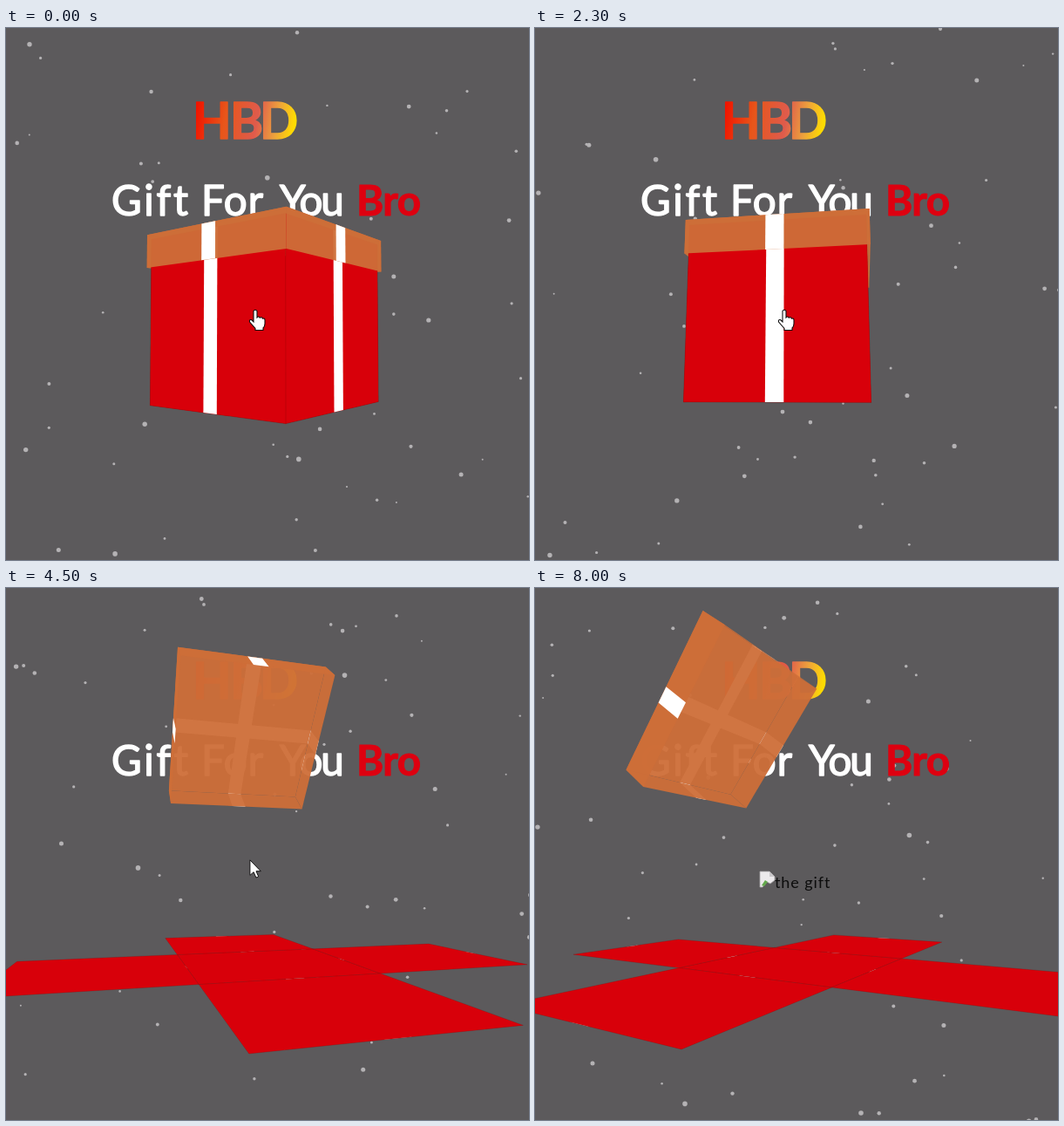
An HTML page for the animation above (8100 ms loop, 600 by 610 pixels).

```html
<!DOCTYPE html>
<html lang="en">
<head>
<meta charset="utf-8">
<title>Gift box</title>
<style>
  html, body { margin: 0; width: 100%; height: 100%; overflow: hidden; background: #5c5a5c; }
  svg { display: block; width: 600px; height: 610px; }
  text { font-family: "Comic Sans MS", "Comic Neue", Lato, sans-serif; }
  .line { font-size: 47.5px; fill: #fff; stroke: #fff; stroke-width: 1.5; stroke-linejoin: round; }
  .bro { font-weight: 700; fill: #de0010; stroke: #de0010; stroke-width: 1; }
  .hbd { font-size: 58px; font-weight: 700; fill: url(#warm); stroke: url(#warm); stroke-width: 1.4; stroke-linejoin: round; }
  .alt { font-size: 18px; letter-spacing: .9px; fill: #0c0c0c; }
  .red { fill: #d8000a; stroke: #8a0008; stroke-opacity: .4; stroke-width: .6; }
  .lid { fill: #ce6e38; fill-opacity: .95; }
  .band { fill: #fff; }
</style>
</head>
<body>
<svg viewBox="0 0 600 610">
  <defs>
    <linearGradient id="warm" gradientUnits="userSpaceOnUse" x1="218" y1="95" x2="330" y2="115">
      <stop offset="0" stop-color="#f01400"/>
      <stop offset=".3" stop-color="#e8561a"/>
      <stop offset=".62" stop-color="#df5b4c"/>
      <stop offset=".82" stop-color="#eda23c"/>
      <stop offset="1" stop-color="#ffdc00"/>
    </linearGradient>
  </defs>
  <rect width="600" height="610" fill="#5c5a5c"/>
  <g id="snow" fill="#b4b2b4"></g>
  <text class="hbd" x="214 257 291" y="127">HBD</text>
  <g class="line">
    <text x="121" y="215" letter-spacing="2.8">Gift</text>
    <text x="224" y="215" letter-spacing="1">For</text>
    <text x="314" y="215" letter-spacing="-2">You</text>
    <text class="bro" x="402" y="215" letter-spacing="-.6">Bro</text>
  </g>
  <g id="box"></g>
  <g id="gift">
    <path d="M258 325h11l6 6v4l-5 4-4-2-5 6h-3z" fill="#eceaec" stroke="#a5a3a5" stroke-width=".8"/>
    <path d="M260 341l4-6 3 2-4 5z" fill="#63a84c"/>
    <path d="M269 325v6h6z" fill="#c9c7c9"/>
    <text class="alt" x="275" y="344">the gift</text>
  </g>
  <path id="arrow" d="M0 0V17.5L4.2 13.8 7 20.2 9.8 19 7.1 12.8H12.4Z" fill="#fff" stroke="#111" stroke-width="1"/>
  <path id="hand" d="M-2 1.5Q0-1 2 1.5V9Q4 7 5.2 9.2 7.5 7.8 8.4 10.2 11 9.5 11 12V16Q11 19 9 21V23.5H0V21.5L-6.5 14Q-7 11-4.5 11.5L-2 14Z" fill="#fff" stroke="#111" stroke-width="1.1"/>
</svg>
<script>
const LOOP = 8100, STEP = 100;
const DEPTH = 560, CX = 300, HORIZON = 335;
const HALF = 92.6, FLOOR = 95, BAND = .1;
const LID_HALF = 96, LID_H = 37, LID_TOP = -95;
const SIDES = [0, 1, 2, 3].map(k => k * Math.PI / 2);

const $ = id => document.getElementById(id);
const rad = deg => deg * Math.PI / 180;
const clamp = v => Math.max(0, Math.min(1, v));
const mix = (a, b, p) => a + (b - a) * p;
const span = (t, a, b) => clamp((t - a) / (b - a));
const smooth = p => p * p * (3 - 2 * p);

// Same curve as the CSS keyword "ease"
function ease(x) {
  const curve = (s, a, b) => 3 * s * (1 - s) ** 2 * a + 3 * s * s * (1 - s) * b + s ** 3;
  let lo = 0, hi = 1;
  for (let i = 0; i < 20; i++) {
    const mid = (lo + hi) / 2;
    if (curve(mid, .25, .25) < x) lo = mid; else hi = mid;
  }
  return x >= 1 ? 1 : curve(lo, .1, 1);
}

function random(seed) {
  return () => {
    seed = (seed * 1664525 + 1013904223) >>> 0;
    return seed / 4294967296;
  };
}

const rnd = random(77);
const flakes = Array.from({ length: 60 }, () => ({
  x: rnd() * 620, y: rnd() * 630, r: 1 + 1.8 * rnd(), vx: (rnd() - .5) * 24, vy: 30 + 50 * rnd()
}));

function drawSnow(sec) {
  const wrap = (v, size) => ((v % size) + size) % size - 10;
  $("snow").innerHTML = flakes.map(f => {
    const x = wrap(f.x + f.vx * sec, 620), y = wrap(f.y + f.vy * sec, 630);
    return `<circle cx="${x.toFixed(1)}" cy="${y.toFixed(1)}" r="${f.r.toFixed(1)}"/>`;
  }).join("");
}

function camera(turn, tilt, zoom, shift) {
  const s = Math.sin(turn), c = Math.cos(turn), ts = Math.sin(tilt), tc = Math.cos(tilt);
  return ([x, y, z]) => {
    const rx = x * c + z * s, rz = z * c - x * s;
    const py = y * tc - rz * ts, pz = rz * tc + y * ts;
    const k = zoom * DEPTH / (DEPTH - pz);
    return [CX + shift + rx * k, HORIZON + py * k, pz];
  };
}

// at(u, v) maps u, v in 0..1 to a point on a face
const patch = (at, u0, u1, v0, v1) => [at(u0, v0), at(u1, v0), at(u1, v1), at(u0, v1)];
const polygon = (name, pts) =>
  `<polygon class="${name}" points="${pts.map(p => p[0].toFixed(1) + "," + p[1].toFixed(1)).join(" ")}"/>`;

function face(view, at, style, cross) {
  const poly = (name, ...range) => polygon(name, patch(at, ...range).map(view));
  const q = patch(at, 0, 1, 0, 1).map(view);
  const area = q.reduce((sum, p, i) => {
    const n = q[(i + 1) % 4];
    return sum + p[0] * n[1] - n[0] * p[1];
  }, 0);
  const outer = area < 0;
  const lo = .5 - BAND / 2, hi = .5 + BAND / 2;
  const body = polygon(style, q);
  const bands = poly("band", lo, hi, 0, 1) + (cross ? poly("band", 0, 1, lo, hi) : "");
  return {
    outer,
    z: q.reduce((sum, p) => sum + p[2], 0) / 4,
    svg: outer ? body + bands : bands + body
  };
}

const wall = (angle, fall) => (u, v) => {
  const s = Math.sin(angle), c = Math.cos(angle);
  const along = (u * 2 - 1) * HALF, up = v * HALF * 2;
  const out = HALF + up * Math.sin(fall);
  return [s * out + c * along, FLOOR - up * Math.cos(fall), c * out - s * along];
};

function lidFaces(open) {
  const tip = rad(52 * open), s = Math.sin(tip), c = Math.cos(tip);
  const cy = mix(LID_TOP, -204, open), cz = mix(0, -114.5, open);
  const place = (x, w, h) => [x, cy - w * s + h * c, cz + w * c + h * s];
  const top = (u, v) => place((u * 2 - 1) * LID_HALF, (1 - v * 2) * LID_HALF, 0);
  const sides = SIDES.map(a => (u, v) => {
    const along = (u * 2 - 1) * LID_HALF, n = Math.sin(a), m = Math.cos(a);
    return place(n * LID_HALF + m * along, m * LID_HALF - n * along, (1 - v) * LID_H);
  });
  return [top, ...sides];
}

function drawBox(t) {
  const open = ease(span(t, 2800, 3800));
  const press = smooth(span(t, 1600, 2300)) * (1 - smooth(span(t, 2300, 2900)));
  const tilt = 9 * press + 2 * (1 - smooth(span(t, 0, 900)));
  const view = camera(rad(-38 + .0121 * t + press), rad(tilt), 1 - .04 * press, -8 * press);
  const byDepth = (a, b) => a.z - b.z;

  const base = (u, v) => [(u * 2 - 1) * HALF, FLOOR, (1 - v * 2) * HALF];
  const floor = polygon("red", patch(base, 0, 1, 0, 1).map(view));

  const walls = SIDES.map(a => face(view, wall(a, rad(90 * open)), "red")).sort(byDepth);
  const [top, ...sides] = lidFaces(open).map((at, i) => face(view, at, "lid", i === 0));
  sides.sort(byDepth);
  const inner = [top, ...sides.filter(f => !f.outer)];
  const outer = sides.filter(f => f.outer);
  const join = list => list.map(f => f.svg).join("");
  $("box").innerHTML = join(inner) + floor + join(walls) + join(outer);
}

function drawGift(t) {
  const p = smooth(span(t, 5200, 5920));
  $("gift").setAttribute("visibility", p > 0 ? "visible" : "hidden");
  $("gift").setAttribute("transform",
    `translate(300 335) scale(${p.toFixed(3)} ${mix(.93, 1, p).toFixed(3)}) translate(-300 -335)`);
}

function drawCursor(t) {
  const pointing = t < 2900;
  const go = smooth(span(t, 4300, 5400)), leave = smooth(span(t, 5700, 6500));
  const x = mix(mix(286, 216, go), -30, leave), y = mix(mix(322, 206, go), 150, leave);
  $("hand").setAttribute("visibility", pointing ? "visible" : "hidden");
  $("arrow").setAttribute("visibility", pointing ? "hidden" : "visible");
  $("hand").setAttribute("transform", "translate(286 323)");
  $("arrow").setAttribute("transform", `translate(${x.toFixed(1)} ${y.toFixed(1)})`);
}

function render(t) {
  drawSnow(t / 1000);
  drawBox(t);
  drawGift(t);
  drawCursor(t);
}

const start = performance.now();
let shown = -1;
function tick() {
  const t = Math.floor(((performance.now() - start) % LOOP) / STEP) * STEP;
  if (t !== shown) render(shown = t);
  requestAnimationFrame(tick);
}
tick();
</script>
</body>
</html>
```
